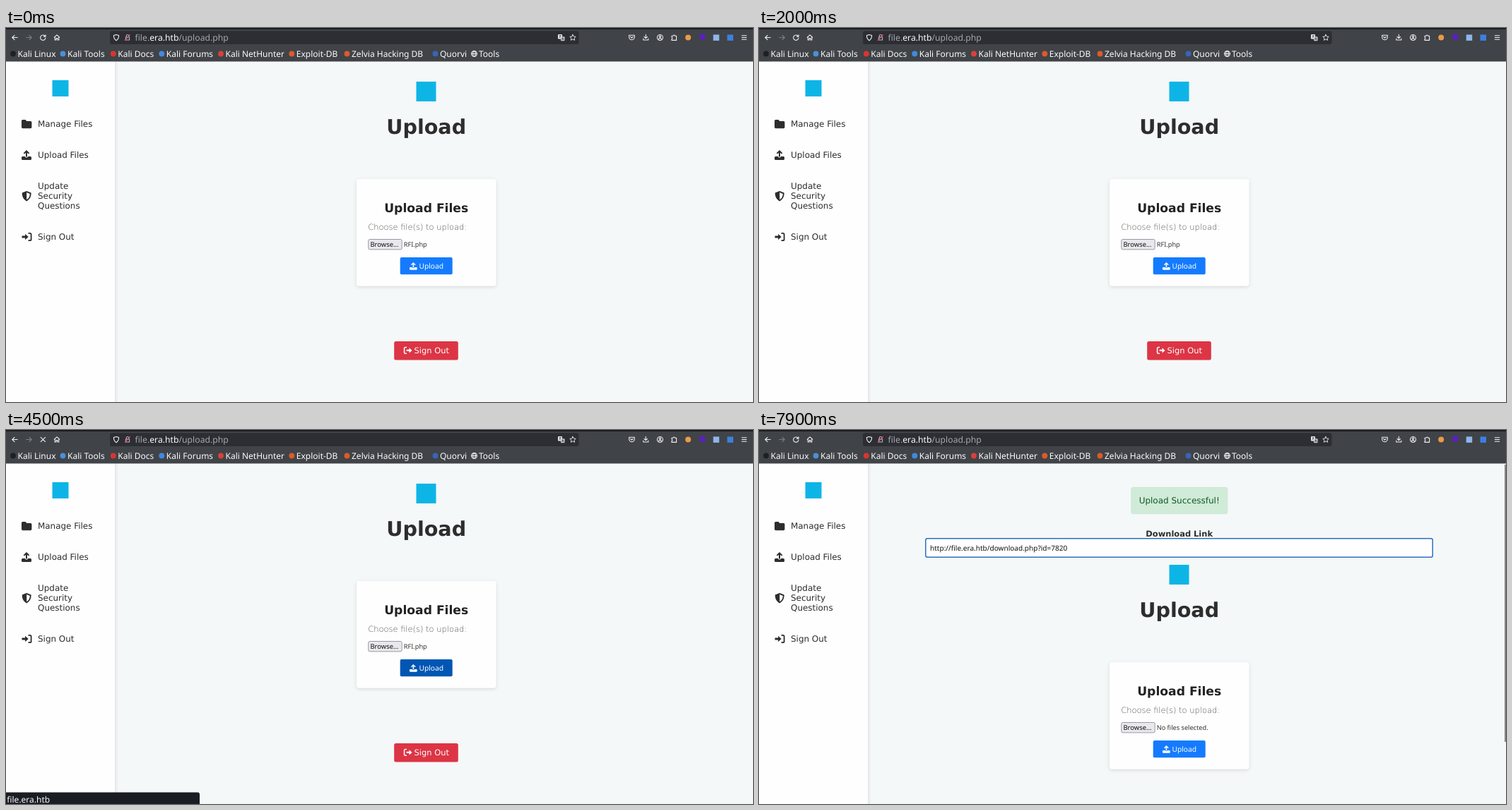
Recreate the animation shown at these times as an HTML page. Size 1057 by 530 pixels, loop 8000 ms.

```html
<!DOCTYPE html>
<html lang="en">
<head>
<meta charset="utf-8">
<title>Upload</title>
<style>
html, body { margin: 0; width: 100%; height: 100%; overflow: hidden; background: #f5f8f8; }
svg { display: block; width: 1057px; height: 530px; }
text { font-family: "DejaVu Sans", Verdana, sans-serif; text-rendering: geometricPrecision; white-space: pre; }
.ui { font-family: "Noto Sans", sans-serif; }
.mid { text-anchor: middle; }
.bold { font-weight: bold; }
.line { fill: none; stroke: #f0f0f4; stroke-width: 1.1; stroke-linecap: round; stroke-linejoin: round; }
.side { font-size: 11.95px; fill: #2d2d2d; }
</style>
</head>
<body>
<svg viewBox="0 0 1057 530">
  <defs>
    <filter id="soft" x="-10%" y="-10%" width="120%" height="125%">
      <feDropShadow dx="0" dy="1.5" stdDeviation="2.5" flood-opacity=".13"/>
    </filter>
    <linearGradient id="edge">
      <stop stop-color="#000" stop-opacity=".07"/><stop offset="1" stop-color="#000" stop-opacity="0"/>
    </linearGradient>
    <!-- 14 x 14 icons -->
    <g id="up">
      <path d="M7 0 11.3 4.3 10 5.6 8 3.7V9.6H6V3.7L4 5.6 2.7 4.3Z"/>
      <path d="M1.5 9H4.8a2.3 2.3 0 0 0 4.4 0h3.3A1.5 1.5 0 0 1 14 10.5v2a1.5 1.5 0 0 1-1.5 1.5h-11A1.5 1.5 0 0 1 0 12.5v-2A1.5 1.5 0 0 1 1.5 9Z"/>
    </g>
    <g id="enter">
      <path d="M0 5.6H4.6V2.8L9.2 7 4.6 11.2V8.4H0Z"/>
      <path d="M9 1.9h2.4A1.7 1.7 0 0 1 13.1 3.6v6.8a1.7 1.7 0 0 1-1.7 1.7H9" fill="none" stroke="currentColor" stroke-width="1.8"/>
    </g>
    <g id="leave">
      <path d="M4.6 5.6H9.2V2.8L14 7 9.2 11.2V8.4H4.6Z"/>
      <path d="M5 1.9H2.6A1.7 1.7 0 0 0 .9 3.6v6.8a1.7 1.7 0 0 0 1.7 1.7H5" fill="none" stroke="currentColor" stroke-width="1.8"/>
    </g>
    <g id="lang">
      <rect width="6" height="6.5" rx="1" fill="#f0f0f4"/>
      <path d="M1.2 1.8H4.8M3 1V1.8M4.2 1.8 1.4 5M2 2.8 4.4 5" fill="none" stroke="#33353a" stroke-width=".7"/>
      <rect x="4" y="3.2" width="5.5" height="6" rx="1" fill="#c9cad0"/>
      <path d="M5.4 8 6.8 4.5 8.2 8M5.9 6.8H7.7" fill="none" stroke="#33353a" stroke-width=".7"/>
    </g>
  </defs>

  <rect width="1057" height="530" fill="#f5f8f8"/>

  <!-- Sidebar -->
  <rect x="154" y="47" width="5" height="483" fill="url(#edge)"/>
  <rect y="47" width="154" height="483" fill="#fefefe"/>
  <rect x="65.5" y="74" width="23" height="23" fill="#0db5e6"/>
  <g class="side" color="#2d2d2d">
    <path d="M23.5 130H27.5L29.3 131.9H34.8A1.6 1.6 0 0 1 36.4 133.5V140.6A1.6 1.6 0 0 1 34.8 142.2H23.6A1.6 1.6 0 0 1 22 140.6V131.5A1.5 1.5 0 0 1 23.5 130Z"/>
    <use href="#up" x="22" y="173"/>
    <path d="M29.2 231 35.6 233.6C35.9 239 33.5 243.3 29.2 245.4 24.9 243.3 22.5 239 22.8 233.6ZM29.2 233V243.3C32.3 241.5 33.8 238.5 33.8 234.9Z" fill-rule="evenodd"/>
    <use href="#enter" x="22.5" y="289"/>
    <text x="45" y="140">Manage Files</text>
    <text x="45" y="184.2">Upload Files</text>
    <text x="45" y="227.8">Update</text>
    <text x="45" y="242.1">Security</text>
    <text x="45" y="256.4">Questions</text>
    <text x="45" y="299.9">Sign Out</text>
  </g>

  <!-- Result of the upload -->
  <g id="result">
    <rect x="526.8" y="81.3" width="136" height="37.4" rx="2.5" fill="#d0ebd7" stroke="#c6e6ce" stroke-width=".7"/>
    <text class="mid" x="594.7" y="104.2" font-size="12" fill="#155724">Upload Successful!</text>
    <text class="mid bold" x="594.7" y="151.3" font-size="11.44" fill="#2d2d2d">Download Link</text>
    <rect id="field" x="236.5" y="154.5" width="716" height="25" rx="1" fill="#fff" stroke="#ccc"/>
    <rect id="focus" x="235.8" y="153.8" width="717.4" height="26.4" rx="2.5" fill="#fff" stroke="#2b70c4" stroke-width="1.5"/>
    <text class="ui" x="242" y="170.8" font-size="10.05" fill="#111">http://file.era.htb/download.php?id=7820</text>
    <rect x="1055" y="49" width="2" height="393" fill="#85868a"/>
  </g>

  <!-- Upload form -->
  <g id="form">
    <rect x="580.5" y="76" width="28" height="28" fill="#0db5e6"/>
    <text class="mid bold" x="594.7" y="150" font-size="28.6" fill="#2d2d2d">Upload</text>
    <rect x="496" y="214" width="197.5" height="151.5" rx="4" fill="#fefefe" filter="url(#soft)"/>
    <text class="mid bold" x="594.7" y="260.6" font-size="17.16" fill="#222">Upload Files</text>
    <text x="512.3" y="286.4" font-size="11.44" font-weight="300" fill="#555">Choose file(s) to upload:</text>
    <rect id="browse" x="512.8" y="299.5" width="47.4" height="14.4" rx="2" stroke="#8f8f9d" stroke-width=".9"/>
    <text class="ui" x="515.4" y="310.2" font-size="9.45" fill="#111">Browse…</text>
    <text id="file" class="ui" x="562.7" y="310.2" font-size="9.2" fill="#333"></text>
    <rect id="send" x="557.7" y="325" width="74" height="24.3" rx="2"/>
    <use href="#up" transform="translate(571 332) scale(.77)" fill="#fff"/>
    <text class="ui" x="584.4" y="341" font-size="10.25" fill="#fff">Upload</text>
    <rect x="549.2" y="444" width="90.6" height="26.5" rx="2.5" fill="#dc3545"/>
    <use href="#leave" transform="translate(562.8 451) scale(.84)" fill="#fff" color="#fff"/>
    <text x="577.6" y="461.1" font-size="11.44" fill="#fff">Sign Out</text>
  </g>

  <g id="tip">
    <rect x="556" y="317" width="57" height="32.3" rx="3" fill="#0c0d12" fill-opacity=".88"/>
    <text class="ui" x="562.6" y="337.8" font-size="12.1" fill="#fbfbfe">RFI.php</text>
  </g>

  <g id="status">
    <path d="M0 513.5H271A3 3 0 0 1 274 516.5V530H0Z" fill="#1b1d24"/>
    <text class="ui" x="1.3" y="527.6" font-size="12" fill="#fbfbfe">file.era.htb</text>
  </g>

  <!-- Browser bars -->
  <rect width="1057" height="47.5" fill="#404347"/>
  <rect width="1057" height="2" fill="#1a1c20"/>
  <rect x="147" y="4.3" width="663.5" height="18.7" rx="3" fill="#2c2e33"/>
  <g class="line">
    <path d="M16.2 13.5H9M12 10.3 8.8 13.5 12 16.7"/>
    <path d="M28.8 13.5H36M33 10.3 36.2 13.5 33 16.7" opacity=".35"/>
    <path id="reload" d="M55.4 11.6A3.7 3.7 0 1 0 56 14M56 9.7V12.1H53.4"/>
    <path id="stop" d="M49.2 10.3 55.6 16.7M55.6 10.3 49.2 16.7"/>
    <path d="M68.3 13.2 72 9.8 75.7 13.2M69.2 12.7V17H71V14.6H73V17H74.8V12.7"/>
    <path d="M156 9.4 159.6 10.6C159.6 14.2 158.4 16.4 156 17.7 153.6 16.4 152.4 14.2 152.4 10.6Z"/>
    <path d="M169.4 13H174.6V17H169.4ZM170.3 13V11.2A1.7 1.7 0 0 1 173.7 11.2V13" stroke="#b4b5ba"/>
    <path d="M168.3 17.3 175.5 9.7" stroke="#f0506a"/>
    <path d="M802 9.3 803.3 12 806.2 12.4 804.1 14.4 804.6 17.3 802 15.9 799.4 17.3 799.9 14.4 797.8 12.4 800.7 12Z" stroke-width=".9"/>
    <path d="M881.7 10.2H889.3V13A3.8 3.8 0 0 1 881.7 13ZM883.7 12.4 885.5 14.2 887.3 12.4"/>
    <path d="M905.3 9.3V14.5M903 12.4 905.3 14.7 907.6 12.4M901.8 15V17H908.8V15"/>
    <circle cx="925.5" cy="13.5" r="4"/><circle cx="925.5" cy="12.3" r="1.2"/><path d="M923.2 16A2.6 2.6 0 0 1 927.8 16"/>
    <path d="M942 11.3H944A1.3 1.3 0 0 1 946.6 11.3H948.6V17.4H942V15.5A1.3 1.3 0 0 0 942 13Z"/>
    <path d="M1041.3 10.7H1047.7M1041.3 13.5H1047.7M1041.3 16.3H1047.7"/>
  </g>
  <use href="#lang" x="781" y="9"/>
  <circle cx="965.2" cy="13.5" r="4" fill="#e99b45"/>
  <circle cx="985.3" cy="12.5" r="4.3" fill="#5b1fc4"/>
  <rect x="1000.7" y="9.4" width="8.5" height="8.5" fill="#8fb5ea"/>
  <rect x="1020.5" y="9.4" width="8.5" height="8.5" fill="#3d7fe0"/>
  <text class="ui" x="182.5" y="17.8" font-size="12.22" fill="#a6a7ac">file.<tspan fill="#fbfbfe">era.htb</tspan>/upload.php</text>
  <g id="marks" class="ui" font-size="12" fill="#fbfbfe"></g>
  <g class="line" stroke-width=".9">
    <circle cx="662.5" cy="36.5" r="3.9"/><ellipse cx="662.5" cy="36.5" rx="1.7" ry="3.9"/><path d="M658.7 36.5H666.3"/>
  </g>
</svg>
<script>
const $ = id => document.getElementById(id);
const show = (id, on) => $(id).setAttribute("visibility", on ? "visible" : "hidden");
const fill = (id, color) => $(id).setAttribute("fill", color);

// Bookmarks: text position, label, icon colour
$("marks").innerHTML = [
  [16.5, "Kali Linux", "#1d2125"], [87, "Kali Tools", "#4a90d9"], [158.3, "Kali Docs", "#d8362f"],
  [226.8, "Kali Forums", "#3f8ae0"], [310.5, "Kali NetHunter", "#d9413b"], [410.8, "Exploit-DB", "#dd5a2b"],
  [489, "Zelvia Hacking DB", "#dd5a2b"], [614, "Quorvi", "#3a63b8"], [669, "Tools"]
].map(([x, label, color]) =>
  `<text class="ui" x="${x}" y="40.8">${label}</text>` +
  (color ? `<circle cx="${x - 6.5}" cy="36.5" r="3.9" fill="${color}"/>` : "")
).join("");

const LOOP = 8000, HOVER = 2100, TIP = 2700, LEAVE = 3100, PRESS = 3300, LOAD = 3700, DONE = 4700, FOCUS = 6000;

function mix(a, b, p) {
  return `rgb(${a.map((v, i) => Math.round(v + (b[i] - v) * p))})`;
}

function draw(now) {
  const t = now % LOOP, done = t >= DONE, loading = t >= LOAD && !done;
  const hover = done ? 0 : Math.min(1, Math.max(0, (t - PRESS) / 300));
  show("result", done);
  $("focus").style.display = t >= FOCUS ? "" : "none";
  show("tip", t >= TIP && t < LEAVE);
  show("status", loading);
  show("stop", loading);
  show("reload", !loading);
  $("form").setAttribute("transform", `translate(0 ${done ? 115 : 0})`);
  $("file").textContent = done ? "No files selected." : "RFI.php";
  fill("browse", t >= HOVER && t < LEAVE ? "#d0d0d7" : "#e9e9ed");
  fill("send", mix([20, 123, 255], [0, 86, 179], hover));
}

const start = performance.now();
function tick() {
  draw(performance.now() - start);
  requestAnimationFrame(tick);
}
tick();
</script>
</body>
</html>
```
